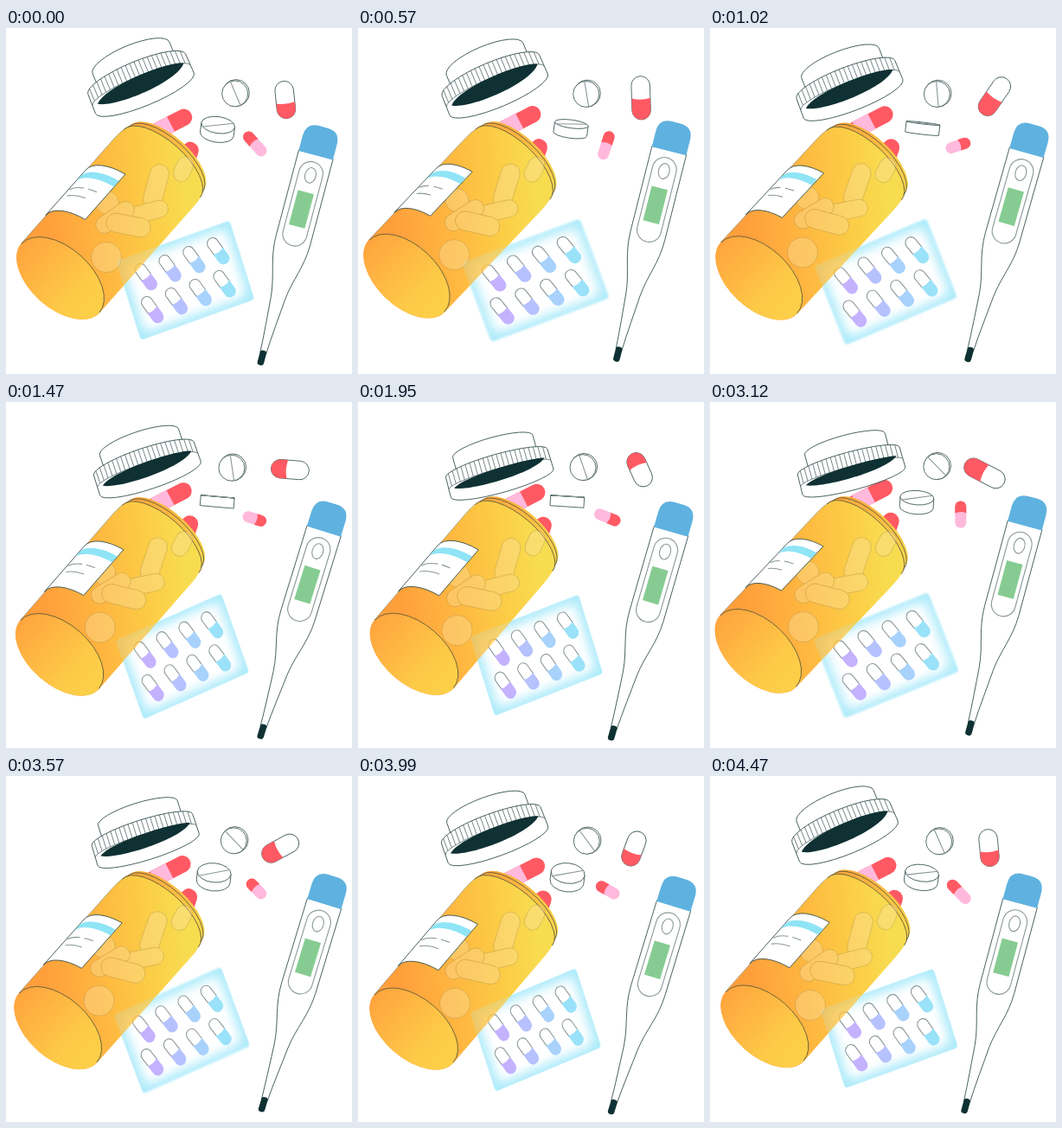
These frames come from a looping animation (400 px wide and 400 px high, 4.5 s). An HTML page:

```html
<!DOCTYPE html>
<html lang="en">
<head>
<meta charset="utf-8">
<title>Medicine</title>
<style>
  html, body { margin: 0; width: 100%; height: 100%; overflow: hidden; background: #fff; }
  svg { display: block; width: 100vw; height: 100vh; }
  .ink { fill: #fff; stroke: #24403f; stroke-width: .75; stroke-linejoin: round; }
  .line { fill: none; stroke: #4c6263; stroke-width: .7; }
  .grey { fill: none; stroke: #8b9798; stroke-width: 1.1; stroke-linecap: round; }
  .dark { fill: #0f3133; }
  .seam { fill: none; stroke: #6b6038; stroke-width: .9; }
  .glass { fill: #fbe3a8; stroke: #a08f5c; stroke-width: .9; }
</style>
</head>
<body>
<svg viewBox="0 0 400 400">
  <defs>
    <linearGradient id="amber" gradientUnits="userSpaceOnUse" x1="-55" y1="150" x2="58" y2="30">
      <stop offset="0" stop-color="#ff9f3c"/>
      <stop offset=".35" stop-color="#ffb43f"/>
      <stop offset=".75" stop-color="#fccd46"/>
      <stop offset="1" stop-color="#f8dc50"/>
    </linearGradient>
    <linearGradient id="base">
      <stop offset="0" stop-color="#ffa53e"/>
      <stop offset=".7" stop-color="#fdca47"/>
      <stop offset="1" stop-color="#fcd049"/>
    </linearGradient>
    <linearGradient id="rim">
      <stop offset="0" stop-color="#fba33d"/>
      <stop offset=".5" stop-color="#fbbd43"/>
      <stop offset="1" stop-color="#f8dc50"/>
    </linearGradient>
    <filter id="soft" x="-20%" y="-20%" width="140%" height="140%">
      <feGaussianBlur stdDeviation="6"/>
    </filter>
    <filter id="edge"><feGaussianBlur stdDeviation=".8"/></filter>
    <clipPath id="packClip"><rect x="-70" y="-48.500" width="140" height="97" rx="4"/></clipPath>
  </defs>

  <g id="pack">
    <rect x="-70" y="-48.500" width="140" height="97" rx="4" fill="#aeebfa" filter="url(#edge)"/>
    <g clip-path="url(#packClip)">
      <rect x="-63" y="-41.500" width="126" height="83" rx="8" fill="#fff" filter="url(#soft)"/>
    </g>
    <g id="blisters"></g>
  </g>

  <g id="spill" fill="none" stroke-width="19.500">
    <path d="M205 103L172 120" stroke="#ff5a63" stroke-linecap="round"/>
    <path d="M190 110.700L172 120" stroke="#ffb9dc"/>
    <path d="M212.500 141L204 166" stroke="#ff5a63" stroke-linecap="round"/>
  </g>

  <g id="bottle">
    <path d="M-56 0A56 25 0 0 1 56 0Q60.500 8 60.500 24V186A60.500 35 0 0 1 -60.500 186V24Q-60.500 8 -56 0Z" fill="url(#amber)"/>
    <path d="M-56 0A56 25 0 0 1 56 0L59 9A59 26 0 0 0 -59 9Z" fill="url(#rim)"/>
    <path class="line" d="M-60.500 186V24Q-60.500 8 -56 0" opacity=".55"/>
    <path class="seam" d="M-57 3A57 25 0 0 1 57 3M-59 9A59 26 0 0 1 59 9"/>
    <ellipse cy="186" rx="60" ry="35" fill="url(#base)"/>
    <path class="seam" d="M-60 186A60 35 0 0 1 60 186"/>
  </g>

  <g id="inside" opacity=".36">
    <circle class="glass" cx="116" cy="265" r="17.500"/>
    <circle class="glass" cx="117" cy="202" r="13.500"/>
    <rect class="glass" x="-26" y="-11" width="52" height="22" rx="11" transform="translate(173.500 183) rotate(-75)"/>
    <rect class="glass" x="-25" y="-10" width="50" height="20" rx="10" transform="translate(163 213) rotate(-15)"/>
    <rect class="glass" x="-25" y="-10" width="50" height="20" rx="10" transform="translate(126 219) rotate(-35)"/>
    <rect class="glass" x="-26" y="-11" width="52" height="22" rx="11" transform="translate(141.500 228) rotate(11)"/>
    <rect class="glass" x="-15" y="-9.500" width="30" height="19" rx="9.500" transform="translate(205 163) rotate(-66)"/>
  </g>
  <g id="sticker">
    <path id="label" class="ink"/>
    <path id="band" fill="#8fe4f6"/>
    <path id="notes" class="grey"/>
  </g>
  <use href="#pack" opacity=".22"/>

  <g id="lid">
    <path id="crown" class="ink"/>
    <path id="skirt" class="ink"/>
    <path id="ridges" class="line"/>
    <path id="hollow" class="dark"/>
  </g>

  <g id="disc">
    <circle class="ink" r="15.500" cx=".7" cy="-.4"/>
    <circle class="ink" r="15" cx="-.5" cy=".4"/>
    <path id="groove" class="grey" d="M-15 0H15"/>
  </g>
  <g id="tablet">
    <path id="wall" class="ink"/>
    <ellipse id="face" class="ink" rx="19.500"/>
    <path id="score" class="grey"/>
  </g>
  <g id="capsule"><rect class="ink"/><path fill="#ff5a63"/></g>
  <g id="small"><rect fill="#ffb9dc"/><path fill="#ff5a63"/></g>

  <g id="thermo">
    <path class="ink" d="M-3.500 -14C-4.500 -36 -6.500 -60 -8 -80C-10.500 -106 -20.500 -122 -20.500 -150V-252H20.500V-150C20.500 -122 11 -106 8.500 -80C7 -60 4.500 -36 3.500 -14Z"/>
    <path d="M-20.500 -251V-269Q-20.500 -285 -5 -285H5Q20.500 -285 20.500 -269V-251Z" fill="#5fb2df"/>
    <rect class="dark" x="-3.800" y="-17.500" width="7.600" height="17.500" rx="3.200"/>
    <rect class="grey" x="-14" y="-243" width="28" height="100" rx="14"/>
    <ellipse class="grey" cy="-227" rx="6.300" ry="9"/>
    <rect x="-9.500" y="-207" width="19" height="41" fill="#86cc92"/>
  </g>
</svg>
<script>
const LOOP = 4500;
const $ = id => document.getElementById(id);
const set = (el, attrs) => { for (const k in attrs) el.setAttribute(k, attrs[k]); };
const move = (id, value) => $(id).setAttribute('transform', value);
const place = (id, x, y, turn) => move(id, `translate(${x} ${y}) rotate(${turn})`);

// Blister pills shade from violet to cyan across the columns
const mix = k => `rgb(${196 - 42 * k},${178 + 48 * k},${255 - 6 * k})`;
let cells = '';
for (let i = 0; i < 8; i++) {
  const col = i % 4, side = i < 4 ? -1 : 1;
  const x = (col - 1.5) * 29.7 - side * 2.2;
  cells += `<g transform="translate(${x} ${side * 19.4}) rotate(-18)">
    <path class="grey" style="fill:#fff" d="M-6.500 1V-11A6.500 6.500 0 0 1 6.500 -11V1"/>
    <path fill="${mix(col / 3)}" d="M-7 0Q0 3 7 0V11A7 7 0 0 1 -7 11Z"/></g>`;
}
$('blisters').innerHTML = cells;

// Arc around the bottle wall: c is its height at the wall's edge
const wallY = (x, c) => c - 29 * Math.sqrt(1 - (x / 61) ** 2);
const wallArc = (a, b, c) => `${a} ${wallY(a, c)}A61 29 0 0 1 ${b} ${wallY(b, c)}`;
const strip = (a, b, top, bottom) =>
  `M${wallArc(a, b, top)}L${b} ${wallY(b, bottom)}A61 29 0 0 0 ${a} ${wallY(a, bottom)}Z`;

function drawCapsule(id, len, width, share) {
  const [shell, cap] = $(id).children, r = width / 2, half = len / 2, x = half - len * share;
  set(shell, { x: -half, y: -r, width: len, height: width, rx: r });
  cap.setAttribute('d',
    `M${x} ${-r}H${half - r}A${r} ${r} 0 0 1 ${half - r} ${r}H${x}Q${x + 3} 0 ${x} ${-r}Z`);
}

// b: how far the rounds of the lid bulge, seen in perspective
function drawLid(b) {
  const top = 1.2 * b;
  $('crown').setAttribute('d', `M-47 -12V-30A48 ${top} 0 0 1 49 -30V-12Z`);
  $('skirt').setAttribute('d',
    `M-61 -10A61 ${top} 0 0 1 61 -10L61.500 14A61.500 ${b + 2} 0 0 1 -61.500 14Z`);
  let d = `M-61 4A61 ${b - 1} 0 0 1 61 4`;
  for (let x = -57; x < 60; x += 5.4) {
    const s = Math.sqrt(1 - (x / 61) ** 2);
    d += `M${x} ${-10 - top * s}V${4 - (b - 1) * s}`;
  }
  $('ridges').setAttribute('d', d);
  const rise = -1.33 * (b - 4), fall = b + 4.5;
  $('hollow').setAttribute('d',
    `M-55 4.500C-40 ${rise} 38 ${rise} 55 -1C40 ${fall} -38 ${fall} -55 4.500Z`);
}

function draw(t) {
  // slow: one swing per loop, fast: two; peak is the time of the maximum
  const swing = n => (mid, amp, peak) => mid + amp * Math.cos(2 * Math.PI * n * (t - peak) / LOOP);
  const slow = swing(1), fast = swing(2);

  // Bottle: spans from the neck to the centre of its base
  const roll = fast(0, 1, 1900), sway = fast(0, 1, 0);
  const nx = 185.2 + sway, ny = 151 - sway;
  const dx = nx - (60.3 + 4.7 * roll), dy = fast(289.5, 2.8, 1650) - ny;
  const lean = Math.atan2(dx, dy) * 180 / Math.PI;
  const pose = `translate(${nx} ${ny}) rotate(${lean}) scale(1 ${Math.hypot(dx, dy) / 186})`;
  move('bottle', pose);
  move('sticker', pose);
  const shift = -2.8 + 3.3 * roll, right = -22.5 + shift;
  $('label').setAttribute('d', strip(-61, right, 73, 143));
  $('band').setAttribute('d', strip(-60.5, right - .5, 83.5, 92.5));
  $('notes').setAttribute('d', `M${wallArc(-60, -48 + shift, 107.5)}M${wallArc(-43 + shift, -34 + shift, 107.5)}
    M${wallArc(-57, -39 + shift, 119.5)}`);
  move('spill', `translate(${2.7 * roll - 1} ${2.5 * roll - 1})`);
  const k = (1 - sway) / 2;
  move('inside', `translate(${-2.5 * k} ${1.5 * k}) rotate(${4.2 * k} 210 170)`);

  move('pack', `matrix(${fast(129, 7.5, 460) / 140} ${fast(-51.3, 4.3, 50) / 140}
    ${fast(32, 3.8, 930) / 97} ${91.2 / 97} ${fast(205.2, 2, 20)} ${fast(292.7, 1.4, 1400)})`);

  place('thermo', fast(295, 3.4, 720), fast(388.2, -3, 760), fast(15.6, -1.6, 400));

  place('lid', slow(160.2, -4, 50) + fast(0, -1.2, 0), slow(72.3, -10, 150), slow(-18.5, -4.5, 350));
  drawLid(slow(10, 2.4, 350));

  place('capsule', slow(323, 6, 1150), slow(81, -3, 1650), slow(165, -92, 150) + fast(0, 9, 0));
  drawCapsule('capsule', fast(46, 5, 760), 21.5, fast(.45, .05, 760));
  place('small', slow(288.3, -1.5, 850), slow(133, 3, 900), slow(297, -88, -480));
  drawCapsule('small', fast(31.8, 3.6, 250), 13, .45);

  place('disc', slow(262.8, 2.4, 4400), slow(75.2, .9, 900), 0);
  move('groove', `rotate(${slow(65, 20, 1050)})`);

  place('tablet', slow(242.5, 3.6, 700), slow(116.2, -1.2, 2050), slow(5.5, 2.5, 200));
  const ry = Math.max(.01, slow(5.2, 6.6, 3900)), h = 6 * Math.sqrt(1 - (ry / 20) ** 2);
  $('wall').setAttribute('d', `M-19.500 ${-h}V${h}A19.500 ${ry} 0 0 0 19.500 ${h}V${-h}Z`);
  set($('face'), { cy: -h, ry });
  $('score').setAttribute('d', `M-17.500 ${-h + .45 * ry}L17.500 ${-h - .45 * ry}`);
}

function tick() {
  draw(performance.now() % LOOP);
  requestAnimationFrame(tick);
}
tick();
</script>
</body>
</html>
```
